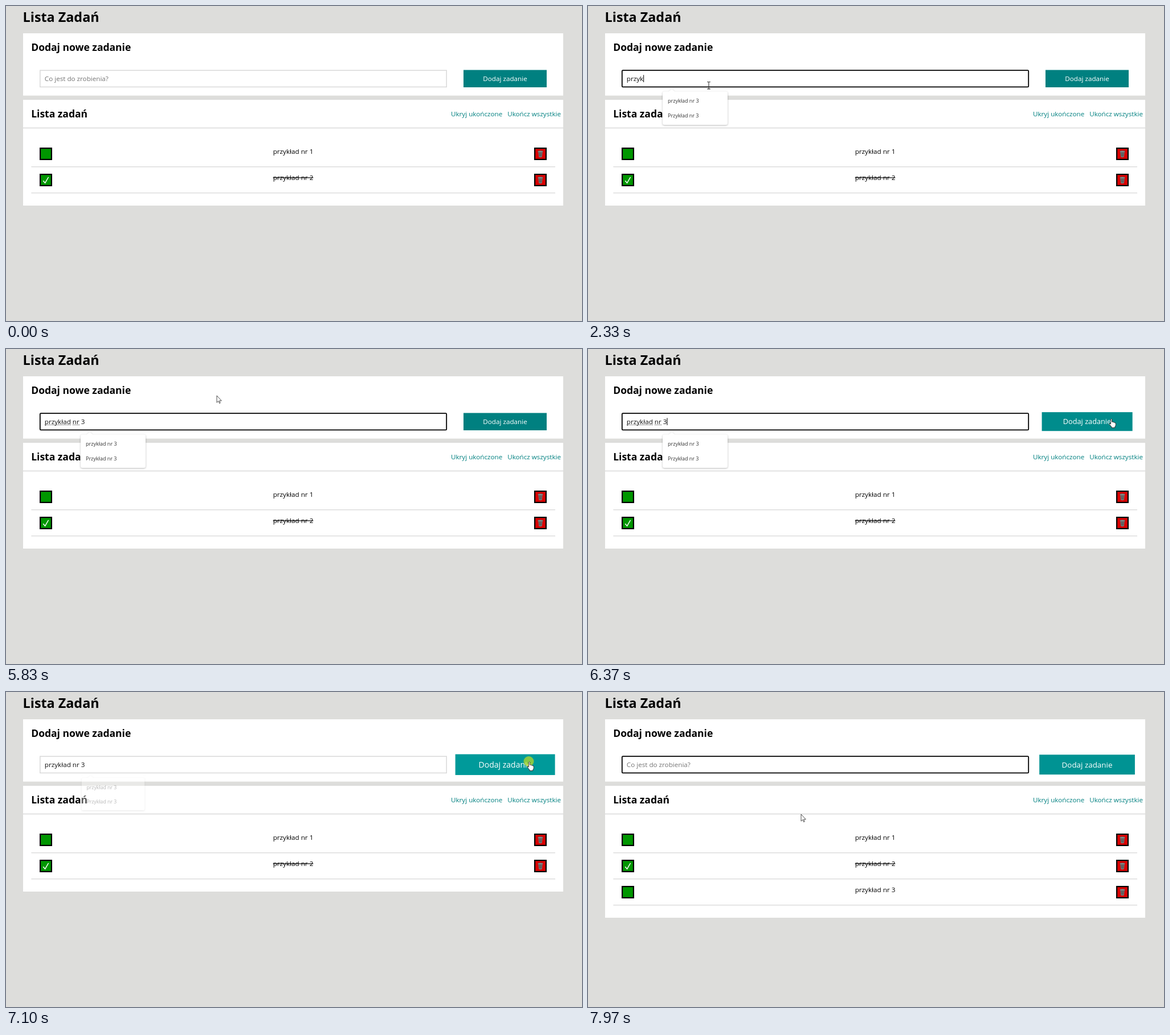
Animation, 1011 px wide and 554 px high, one loop 8 s. Source, as an HTML page:

```html
<!DOCTYPE html>
<html lang="pl">
<head>
<meta charset="utf-8">
<title>Lista Zadań</title>
<style>
  html, body { margin: 0; width: 100%; height: 100%; overflow: hidden; background: #dddddb; }
  svg { display: block; width: 100%; height: 100%; }
  text { font: 11.67px "Open Sans", "Noto Sans", sans-serif; white-space: pre; }
  .title { font-size: 23.34px; font-weight: 700; }
  .heading { font-size: 17.5px; font-weight: 700; }
  .link { fill: #008080; text-anchor: end; }
  .mid { text-anchor: middle; }
  .done { text-decoration: line-through; }
  #menu text { font-size: 9px; fill: #333; }
  #panel { filter: drop-shadow(0 1px 1.5px rgba(0, 0, 0, .28)); }
  #button, #menu { transform-box: fill-box; transform-origin: center; }
</style>
</head>
<body>
<svg viewBox="0 0 1011 554">
  <defs>
    <g id="row">
      <rect x="60.1" y="250.1" width="19.8" height="19.8" fill="#009600" stroke="#000" stroke-width="2.2"/>
      <rect x="928.1" y="250.1" width="19.8" height="19.8" fill="#db0000" stroke="#000" stroke-width="2.2"/>
      <path d="M934.2 256.6h7.6l-1 9q-2.8 1.2-5.6 0z" fill="#777"/>
      <path d="M936 257.5l.6 7M938 257.5v7.4M940 257.5l-.6 7M935 260h6M935.3 262.6h5.4" stroke="#444" stroke-width=".5"/>
      <ellipse cx="938" cy="256" rx="4.6" ry="1.5" fill="#8e8e8e" stroke="#4a4a4a" stroke-width=".6"/>
      <path d="M44.4 282.7H964" stroke="#ddd" stroke-width="1.4"/>
    </g>
  </defs>

  <text class="title" x="29.6" y="27.5">Lista Zadań</text>
  <rect x="30" y="48" width="948" height="109.6" fill="#fff"/>
  <text class="heading" x="44.2" y="79.2">Dodaj nowe zadanie</text>
  <rect id="field" x="59.8" y="113.2" width="713.4" height="29.2" fill="#fff"/>
  <text id="entry" x="67.8" y="132"></text>
  <path id="spelling" stroke="#444" stroke-width="1" stroke-dasharray="1.4 1.2"/>
  <rect id="caret" y="121.3" width="1" height="12.7"/>
  <g id="button">
    <rect x="803" y="112.5" width="146" height="30.5"/>
    <text class="mid" x="876" y="132" fill="#fff">Dodaj zadanie</text>
  </g>

  <rect id="list" x="30" y="165" width="948" height="186" fill="#fff"/>
  <text class="heading" x="44.2" y="196">Lista zadań</text>
  <text class="link" x="871.2" y="194">Ukryj ukończone</text>
  <text class="link" x="974" y="194">Ukończ wszystkie</text>
  <path d="M30 214.4H978" stroke="#d9d9d9" stroke-width="1.5"/>
  <use href="#row"/>
  <text class="mid" x="504" y="260">przykład nr 1</text>
  <use href="#row" y="46"/>
  <text class="mid done" x="504" y="306">przykład nr 2</text>
  <path d="M65.2 307.2L68.6 311.2 74.6 300.8" fill="none" stroke="#fff" stroke-width="1.4"/>
  <g id="added">
    <use href="#row" y="92"/>
    <text class="mid" x="504" y="352">przykład nr 3</text>
  </g>

  <g id="menu">
    <path id="panel" fill="#fff" d="M134 150.3H142L147 146 152 150.3H242q3 0 3 3V206q0 3-3 3H134q-3 0-3-3V153.300q0-3 3-3z"/>
    <text x="140" y="170.300">przykład nr 3</text>
    <text x="140" y="196.300">Przykład nr 3</text>
  </g>

  <circle id="click" r="9" fill="#f5ee00" fill-opacity=".55"/>
  <g id="pointer">
    <path id="arrow" d="M0 0V12.2L2.8 9.6 4.6 13.6 6.2 12.9 4.5 9H8.3Z" fill="#fff" stroke="#222" stroke-width=".8"/>
    <path id="ibeam" d="M-2.8-6H-.8L0-5.400.8-6H2.800M-2.800 6.400H-.8L0 5.800.8 6.400H2.800M0-5.400V5.800" fill="none" stroke="#333" stroke-width="1.1"/>
    <path id="hand" d="M-1 1.200Q.1-.8 1.200 1.200V5.800l1-.2q1-.1 1.300.8l1.100-.1q1 0 1.200.9 2-.2 2 1.300V11q0 2-1.500 3.200V16H.5V14.500L-3.500 9.800q-.5-1.600 1-1.400L-1 9.500Z" fill="#fff" stroke="#222" stroke-width=".9"/>
  </g>
</svg>
<script>
const LOOP = 8000, STEP = 1000 / 15;
const BLUR = 7035, SUBMIT = 7167;
const PHRASE = 'przykład nr 3';
const KEY_TIMES = [1400, 1470, 1730, 1930, 2330, 2730, 3060, 3260, 3520, 4650, 4840, 4910, 5170];
const CLICKS = [
  { from: 670, to: 740, x: 210.5, y: 140 },
  { from: BLUR, to: SUBMIT, x: 917.5, y: 122 }
];
const MOVES = [
  { start: 67, points: [[861, 525], [560, 335], [300, 190], [211.5, 147]] },
  { start: 467, points: [[211.5, 143], [212, 139.5]] },
  { start: 5700, points: [[225, 134], [270, 114], [370, 82], [520, 57], [680, 60], [790, 88],
                          [852, 114], [892, 121], [918.5, 122.5]] },
  { start: 7633, points: [[905, 126], [845, 136], [745, 152], [610, 175], [480, 198], [374, 215]] }
];

const ui = {};
document.querySelectorAll('[id]').forEach(el => ui[el.id] = el);
const show = (el, on) => el.style.display = on ? '' : 'none';
const set = (el, attrs) => Object.entries(attrs).forEach(([k, v]) => el.setAttribute(k, v));

// Each track: [time, properties, easing to the next key]
const tracks = [];
function track(el, keys) {
  const duration = keys[keys.length - 1][0];
  const frames = keys.map(([time, props, easing = 'linear']) => ({ ...props, easing, offset: time / duration }));
  const animation = el.animate(frames, { duration, fill: 'both' });
  animation.pause();
  tracks.push(animation);
}

function hoverTrack(el, rest, hover) {
  track(el, [[0, rest], [6095, rest, 'ease'], [7095, hover], [7785, hover, 'ease'], [8785, rest]]);
}
hoverTrack(ui.button, { transform: 'scale(1)' }, { transform: 'scale(1.2)' });
hoverTrack(ui.button.firstElementChild, { fill: '#008080' }, { fill: '#009a9a' });

const hidden = { opacity: 0, transform: 'scale(1)' }, open = { opacity: 1, transform: 'scale(1)' };
track(ui.menu, [
  [0, hidden], [1333, hidden], [1467, open], [7000, open],
  [7100, { opacity: .35, transform: 'scale(.97)' }],
  [7160, { opacity: 0, transform: 'scale(.95)' }], [8785, hidden]
]);

function drawPointer(t) {
  const move = MOVES.filter(m => t >= m.start).pop();
  show(ui.pointer, move);
  if (!move) return;
  const index = Math.floor((t - move.start + 4) / STEP);
  const [x, y] = move.points[Math.min(index, move.points.length - 1)];
  const within = (left, right) => x > left && x < right && y > 112 && y < 144;
  const overField = within(59, 774), overButton = within(803, 949);
  ui.pointer.setAttribute('transform', `translate(${x} ${y})`);
  show(ui.ibeam, overField);
  show(ui.hand, overButton);
  show(ui.arrow, !overField && !overButton);
}

function drawField(t) {
  const focused = t >= 670 && t < BLUR || t >= SUBMIT;
  const typed = t < SUBMIT ? KEY_TIMES.filter(time => time <= t).length : 0;
  set(ui.field, { stroke: focused ? '#000' : '#d9d9d9', 'stroke-width': focused ? 1.8 : 1.5, rx: focused ? 1.5 : 0 });

  ui.entry.textContent = PHRASE.slice(0, typed) || 'Co jest do zrobienia?';
  ui.entry.setAttribute('fill', typed ? '#111' : '#757575');

  const lastKey = t >= SUBMIT ? SUBMIT : Math.max(670, KEY_TIMES[typed - 1] || 0);
  show(ui.caret, focused && (t - lastKey) % 990 < 530);
  ui.caret.setAttribute('x', 67.8 + (typed ? ui.entry.getComputedTextLength() : 0));

  show(ui.spelling, focused && typed > 8);
  ui.spelling.setAttribute('d', 'M68 133.5H114' + (typed > 11 ? 'M117.2 133.5H129' : ''));
}

function draw(t) {
  const base = t < 5000 ? 0 : 5700;
  const snapped = Math.max(0, base + Math.floor((t - base + 4) / STEP) * STEP);
  tracks.forEach(animation => animation.currentTime = snapped);

  drawField(t);
  drawPointer(t);

  const click = CLICKS.find(c => t >= c.from && t < c.to);
  show(ui.click, click);
  if (click) set(ui.click, { cx: click.x, cy: click.y });

  show(ui.added, t >= SUBMIT);
  ui.list.setAttribute('height', t >= SUBMIT ? 232 : 186);
}

const began = performance.now();
function tick() {
  draw((performance.now() - began) % LOOP);
  requestAnimationFrame(tick);
}
tick();
</script>
</body>
</html>
```
